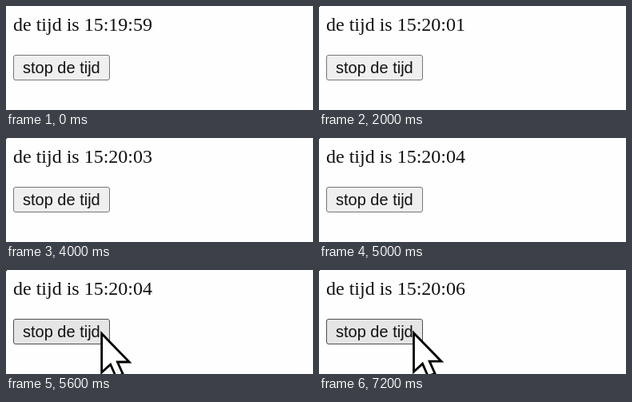
An HTML page for the animation above (8000 ms loop, 384 px wide and 130 px high).

```html
<!DOCTYPE html>
<html lang="nl">
<head>
<meta charset="utf-8">
<title>de tijd</title>
<style>
html, body { margin: 0; width: 100%; height: 100%; overflow: hidden; background: #fefefe; }
svg { display: block; }
text { fill: #111; }
#clock { font: 24px "Liberation Serif", "Times New Roman", serif; }
#label { font: 20px "Liberation Sans", Arial, sans-serif; }
</style>
</head>
<body>
<svg width="384" height="130" viewBox="0 0 384 130">
  <rect width="384" height="130" fill="#fefefe"/>
  <rect id="dot" width="1" height="1"/>
  <text id="clock" x="9" y="31"></text>
  <rect id="button" x="9.5" y="61.5" width="120" height="31" rx="2.5"/>
  <text id="label" x="21" y="84">stop de tijd</text>
  <path id="cursor" d="M0 0V48.5L11 38.5L17.8 54L26.5 50.5L19.7 35.5H34.5Z"
    fill="#fff" stroke="#000" stroke-width="2.8" stroke-linejoin="miter"/>
</svg>
<script>
const LOOP = 8000, TICK = 200;
const START = 15 * 3600 + 19 * 60 + 59;
const $ = id => document.getElementById(id);
const pad = n => String(n).padStart(2, "0");

// time, then the tip of the pointer
const moves = [[5200, 154.5, 117], [5400, 137.5, 95], [5600, 119.7, 79.5], [5800, 118.5, 78.7]];
const looks = {
  idle: ["#efefef", "#767676"],
  hover: ["#e5e5e5", "#4f4f4f"],
  active: ["#f5f5f5", "#8d8d8d"]
};

function timeText(s) {
  return [s / 3600, s / 60 % 60, s % 60].map(v => pad(Math.floor(v))).join(":");
}

function draw(ms) {
  const t = Math.floor(ms % LOOP / TICK) * TICK;
  $("clock").textContent = "de tijd is " + timeText(START + Math.floor(t / 1000));
  $("dot").style.display = t < 400 ? "none" : "";

  const look = t < 5600 ? "idle" : t === 6800 ? "active" : "hover";
  const [fill, stroke] = looks[look];
  $("button").setAttribute("fill", fill);
  $("button").setAttribute("stroke", stroke);

  const pos = moves.filter(m => m[0] <= t).pop();
  $("cursor").style.display = pos ? "" : "none";
  if (pos) $("cursor").setAttribute("transform", `translate(${pos[1]} ${pos[2]})`);
}

let begin;
function frame(now) {
  begin ??= now;
  draw(now - begin);
  requestAnimationFrame(frame);
}
draw(0);
requestAnimationFrame(frame);
</script>
</body>
</html>
```
